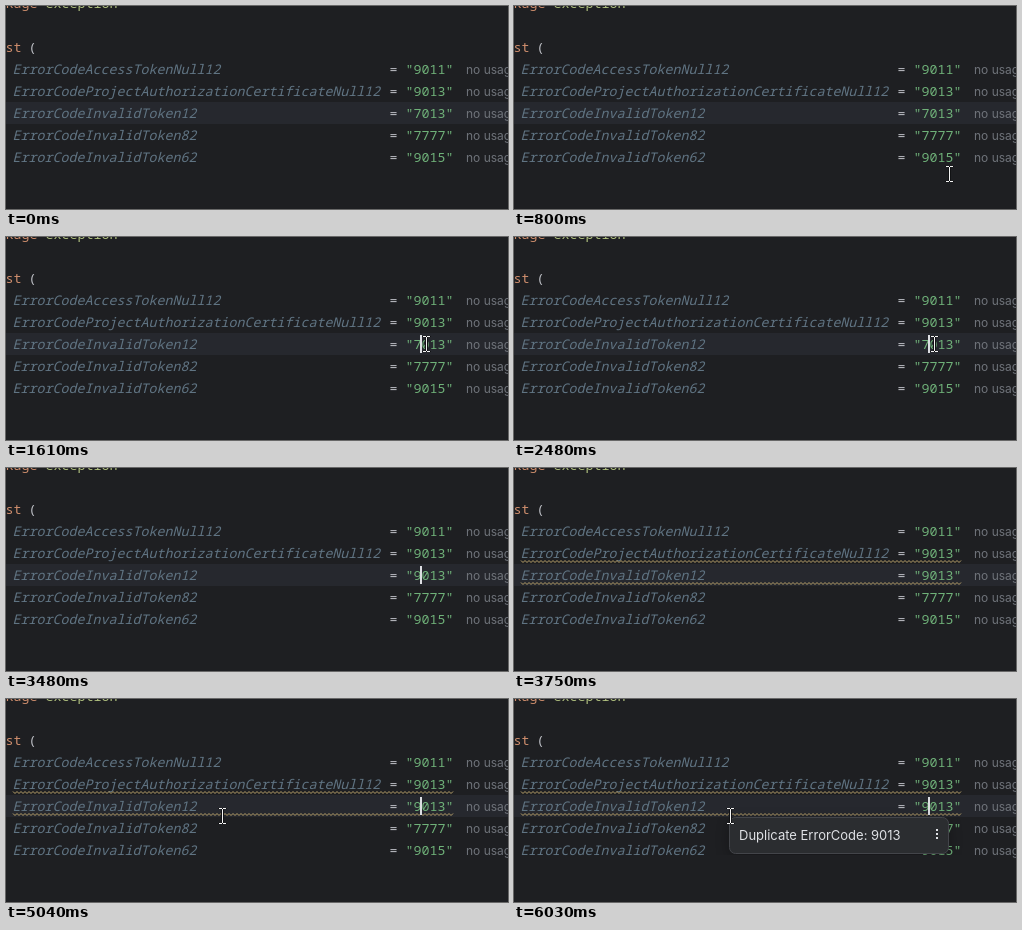
Write an HTML page with a canvas that moves like this. It is 502 by 203 pixels and loops after 6450 ms.

```html
<!DOCTYPE html>
<html lang="en">
<head>
<meta charset="utf-8">
<title>Duplicate error code inspection</title>
<style>
html, body { margin: 0; width: 100%; height: 100%; overflow: hidden; background: #1e1f22; }
canvas { display: block; }
</style>
</head>
<body>
<canvas id="stage" width="502" height="203"></canvas>
<script>
const ctx = document.getElementById('stage').getContext('2d');
const LOOP = 6450, STEP = 70, BLINK = 460;
const CELL = 8, LEFT = 7.5, LINE = 22, FIRST_BASELINE = 68;
const MONO = '13.333px "Noto Sans Mono", monospace';
const HINT = '12px Inter, sans-serif';
const COLOR = {
  back: '#1e1f22', row: '#26282e', text: '#bcbec4', keyword: '#cf8e6d', package: '#afbf7e',
  name: '#607483', string: '#6fb179', hint: '#6f737a', wave: '#b9a26b',
  caret: '#dcdee2', popup: '#2b2d30', border: '#43454a', popupText: '#dfe1e5'
};
const CONSTANTS = [
  ['ErrorCodeAccessTokenNull12', '9011'],
  ['ErrorCodeProjectAuthorizationCertificateNull12', '9013'],
  ['ErrorCodeInvalidToken12', ''],
  ['ErrorCodeInvalidToken82', '7777'],
  ['ErrorCodeInvalidToken62', '9015']
];
const CLICKED = 1540, DELETED = 2610, HIDDEN = 2730, TYPED = 3410, WARNED = 3750, POPUP = 5240;

// Pointer key points; it glides straight from one to the next.
const ENTER = [
  { t: 730, x: 446, y: 194 }, { t: 940, x: 414, y: 117 }, { t: 1070, x: 414, y: 117 },
  { t: 1210, x: 404, y: 104 }, { t: 1340, x: 414, y: 109 }, { t: CLICKED, x: 420, y: 107 }
];
const HOVER = [
  { t: 4150, x: 414, y: 105 }, { t: 4430, x: 266, y: 105 }, { t: 4710, x: 216, y: 117 }
];

function glide(path, t) {
  const next = path.findIndex(key => key.t > t);
  if (next < 0) return path.at(-1);
  const a = path[next - 1], b = path[next];
  const elapsed = Math.floor((t - a.t) / STEP) * STEP;
  const p = elapsed / (b.t - a.t);
  return { x: Math.round(a.x + (b.x - a.x) * p), y: Math.round(a.y + (b.y - a.y) * p) };
}

function pointerAt(t) {
  if (t >= HOVER[0].t) return glide(HOVER, t);
  if (t >= ENTER[0].t && t < HIDDEN) return glide(ENTER, t);
}

function caretVisible(t) {
  if (t < CLICKED) return false;
  if (t >= DELETED && t < WARNED) return true;
  const since = t < DELETED ? CLICKED : WARNED - 1.2 * BLINK;
  return Math.floor((t - since) / BLINK) % 2 === 0;
}

function write(text, x, y, color, font = MONO) {
  ctx.font = font;
  ctx.fillStyle = color;
  ctx.fillText(text, x, y);
}

function wave(y) {
  ctx.beginPath();
  for (let x = 7; x <= 447; x += 2) ctx.lineTo(x, y + (x - 7) % 4);
  ctx.strokeStyle = COLOR.wave;
  ctx.lineWidth = 1;
  ctx.stroke();
}

function drawCode(value) {
  ctx.fillStyle = COLOR.row;
  ctx.fillRect(0, 96, 502, LINE);
  write('package', LEFT - 4 * CELL, 2, COLOR.keyword);
  write('exception', LEFT + 4 * CELL, 2, COLOR.package);
  write('const', LEFT - 4 * CELL, 46, COLOR.keyword);
  write('(', LEFT + 2 * CELL - 1, 46, COLOR.text);
  CONSTANTS.forEach(([name, code], i) => {
    const y = FIRST_BASELINE + i * LINE;
    const literal = `"${code || value}"`;
    const start = LEFT + 49 * CELL;
    write(name, LEFT - 1, y, COLOR.name, 'italic ' + MONO);
    write('=', LEFT + 47 * CELL, y, COLOR.text);
    write(literal, start, y, COLOR.string);
    write('no usages', start + literal.length * CELL + 12.5, y, COLOR.hint, HINT);
  });
}

function drawPopup() {
  ctx.save();
  ctx.beginPath();
  ctx.rect(178, 105, 294, 51);
  ctx.clip();
  ctx.beginPath();
  ctx.roundRect(215.5, 118.5, 219, 36, 6);
  ctx.shadowColor = 'rgba(0,0,0,.3)';
  ctx.shadowBlur = 14;
  ctx.shadowOffsetY = 4;
  ctx.fillStyle = COLOR.popup;
  ctx.fill();
  ctx.shadowColor = 'transparent';
  ctx.strokeStyle = COLOR.border;
  ctx.lineWidth = 1;
  ctx.stroke();
  ctx.restore();
  write('Duplicate ErrorCode: 9013', 225, 141, COLOR.popupText, '13px Inter, sans-serif');
  for (let i = 0; i < 3; i++) ctx.fillRect(422, 130 + 4 * i, 2, 2);
}

function beam(x, y, color, edge) {
  ctx.fillStyle = color;
  ctx.fillRect(x - edge, y - 7, 1 + 2 * edge, 14);
  for (const end of [y - 8, y + 7]) {
    for (const side of [x - 3, x + 1]) ctx.fillRect(side - edge, end, 3 + 2 * edge, 1);
  }
}

function draw(t) {
  const edited = t >= DELETED && t < TYPED;
  ctx.fillStyle = COLOR.back;
  ctx.fillRect(0, 0, 502, 203);
  drawCode(t < DELETED ? '7013' : edited ? '013' : '9013');
  if (t >= WARNED) {
    wave(92.5);
    wave(92.5 + LINE);
  }
  if (caretVisible(t)) {
    ctx.fillStyle = COLOR.caret;
    ctx.fillRect(edited ? 414 - CELL : 414, 98, 2, 18);
  }
  if (t >= POPUP) drawPopup();
  const pointer = pointerAt(t);
  if (pointer) {
    beam(pointer.x, pointer.y, '#111214', 1);
    beam(pointer.x, pointer.y, '#f4f4f4', 0);
  }
}

const start = performance.now();
function tick() {
  draw((performance.now() - start) % LOOP);
  requestAnimationFrame(tick);
}
tick();
</script>
</body>
</html>
```
